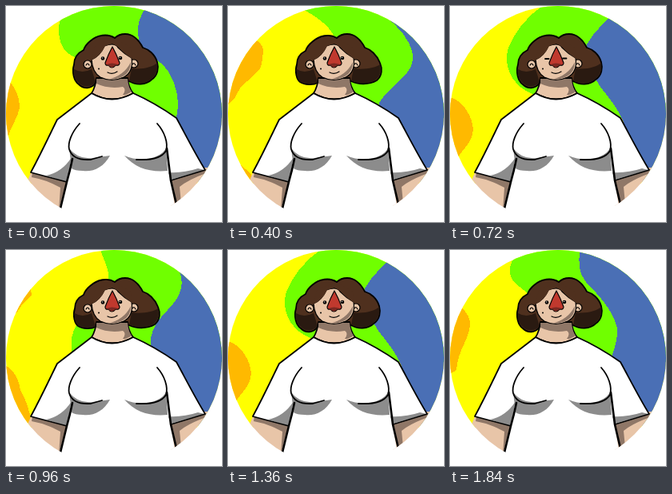
These frames come from a looping animation (270x270 px, 1.92 s). An HTML page without scripts:

```html
<!DOCTYPE html>
<html lang="en">
<head>
<meta charset="utf-8">
<title>Portrait with flowing colours</title>
<style>
html, body { margin: 0; width: 100%; height: 100%; overflow: hidden; background: #fff; }
svg { display: block; width: 100vw; height: 100vh; }
.step { visibility: hidden; animation: show .64s step-end infinite; animation-delay: calc(var(--i) * .08s - .64s); }
@keyframes show { 0% { visibility: visible; } 12.5%, 100% { visibility: hidden; } }
.open { animation: open 1.92s step-end infinite; }
.shut { visibility: hidden; animation: shut 1.92s step-end infinite; }
@keyframes open { 0%, 45.8333%, 100% { visibility: visible; } 37.5% { visibility: hidden; } }
@keyframes shut { 0%, 45.8333%, 100% { visibility: hidden; } 37.5% { visibility: visible; } }
.wave { shape-rendering: crispEdges; }
.g { fill: #70ff00; }
.b { fill: #4a6fb5; }
.o { fill: #ffb900; }
.ink { stroke: #000; stroke-width: 1.8; stroke-linejoin: round; stroke-linecap: round; }
.thin { stroke-width: 1.2; }
.bold { stroke-width: 2.6; }
.line { fill: none; }
.skin { fill: #e8c5a8; }
.dim { fill: #8f7767; }
.grey { fill: #8c8c8c; }
.hair { fill: #4f301e; }
.dark { fill: #2a1a11; }
</style>
</head>
<body>
<svg viewBox="0 0 270 270">
<defs>
  <clipPath id="disc"><circle cx="135" cy="135" r="135"/></clipPath>
  <g id="round">
    <path class="hair ink" d="M136 40C127 34 114 36 105 44Q99 49 97 55C89 59 85 66 85 73C82 83 85 94 91 98C97 104 107 104 112 96L154 94C162 99 175 99 182 92C190 87 191 77 189 70C186 60 178 54 171 52C166 42 158 35 149 35Q141 35 136 40Z"/>
    <path class="dark" d="M85 79Q95 85 107 79L112 95C106 102 97 102 92 97Q84 91 85 79ZM157 78C170 80 184 76 189 71Q191 83 182 91C174 98 162 98 154 93Z"/>
  </g>
  <g id="flared">
    <path class="hair ink" d="M136 40C127 34 114 37 105 45Q99 50 97 56C89 60 86 66 86 73C83 82 86 92 90 95C96 99 107 99 112 96L154 94C162 98 176 99 186 93C193 87 193 78 190 71C186 61 178 54 171 52C166 42 158 35 149 35Q141 35 136 40Z"/>
    <path class="dark" d="M86 79Q95 85 107 79L112 95C106 98 97 98 91 95Q85 90 86 79ZM157 78C170 80 185 77 190 73Q193 85 185 92C176 98 162 97 154 93Z"/>
  </g>
</defs>

<g clip-path="url(#disc)">
  <path fill="#ff0" d="M0 0H270V222H0Z"/>

  <g class="wave">
    <g class="step" style="--i:0">
      <path class="g" d="M74 0C66 15 64 32 68 45C72 57 80 62 92 67L130 140H270V0Z"/>
      <path class="b" d="M177 0C168 10 164 22 165 34C165 60 188 60 203 82C214 100 218 120 213 140L205 220H270V0Z"/>
      <path class="o" d="M0 92C9 96 17 112 17 127C15 140 6 150 3 162H0Z"/>
    </g>
    <g class="step" style="--i:1">
      <path class="g" d="M115 0C95 14 80 34 73 52C68 68 73 86 82 95C90 105 100 109 112 113L130 140H270V0Z"/>
      <path class="b" d="M214 0C198 16 181 30 171 48C170 66 178 87 188 101C200 117 210 128 217 145L214 220H270V0Z"/>
      <path class="o" d="M0 114C16 118 28 138 29 154C28 174 12 180 7 196H0Z"/>
    </g>
    <g class="step" style="--i:2">
      <path class="g" d="M124 0C118 18 100 32 86 52C74 72 73 92 82 108C90 116 98 120 108 122L130 140H270V0Z"/>
      <path class="b" d="M218 0C216 25 196 38 184 60C176 78 182 92 194 108C208 125 216 145 217 165L214 220H270V0Z"/>
      <path class="o" d="M0 130C14 137 26 150 28 166C28 182 20 192 16 212H0Z"/>
    </g>
    <g class="step" style="--i:3">
      <path class="g" d="M124 0C128 20 122 40 112 55C92 75 78 95 80 112C82 124 92 130 100 132L130 140H270V0Z"/>
      <path class="b" d="M210 0C216 18 214 38 200 58C184 75 178 92 182 104C190 120 205 145 214 220H270V0Z"/>
      <path class="o" d="M0 138Q16 148 22 168Q28 185 28 212L0 220Z"/>
    </g>
    <g class="step" style="--i:4">
      <path class="g" d="M118 0C124 18 132 28 126 45L100 75C86 95 78 108 83 130L130 140H270V0Z"/>
      <path class="b" d="M200 0C215 20 222 32 219 48C215 68 190 82 184 100Q178 115 182 125L200 220H270V0Z"/>
      <path class="o" d="M0 145Q14 152 18 175Q27 190 32 215L0 220ZM0 90L14 78Q20 66 32 57L30 40H0Z"/>
    </g>
    <g class="step" style="--i:5">
      <path class="g" d="M85 0C104 9 126 22 133 39L112 75V110L130 140H270V0Z"/>
      <path class="b" d="M180 0C202 16 218 30 226 46C236 66 230 78 218 90C206 102 194 112 189 121L200 220H270V0Z"/>
      <path class="o" d="M30 40Q44 46 44 57C42 68 44 78 35 84C26 94 16 98 12 108Q8 118 0 123V40ZM0 190Q20 198 34 217H0Z"/>
    </g>
    <g class="step" style="--i:6">
      <path class="g" d="M88 0C86 12 98 25 112 45C118 65 112 90 110 108L130 140H270V0Z"/>
      <path class="b" d="M172 0C190 22 216 45 222 75C222 98 205 110 196 127L200 220H270V0Z"/>
      <path class="o" d="M18 62Q36 66 36 84C32 102 18 112 8 132L0 140V60Z"/>
    </g>
    <g class="step" style="--i:7">
      <path class="g" d="M92 0C78 8 72 20 76 33C80 45 98 50 105 65L110 100L130 140H270V0Z"/>
      <path class="b" d="M163 0C160 14 160 28 170 40C185 56 204 75 209 98C210 112 205 124 202 134L205 220H270V0Z"/>
      <path class="o" d="M14 72Q26 82 25 95C22 115 10 125 8 150L0 155V72Z"/>
    </g>
  </g>

  <use class="step" style="--i:0" href="#round"/>
  <use class="step" style="--i:1" href="#round"/>
  <use class="step" style="--i:2" href="#round"/>
  <use class="step" style="--i:3" href="#flared"/>
  <use class="step" style="--i:4" href="#flared"/>
  <use class="step" style="--i:5" href="#flared"/>
  <use class="step" style="--i:6" href="#flared"/>
  <use class="step" style="--i:7" href="#round"/>

  <!-- arms -->
  <path class="skin" d="M33 204L15 245L62 275L77 215Z"/>
  <path class="dim" d="M33 208L76 219L66 256L68 227Q50 217 32 214Z"/>
  <path class="skin" d="M202 213L208 270H275V202H248Z"/>
  <path class="dim" d="M205 217L249 205L250 209Q228 217 217 226L219 247L212 248Z"/>

  <!-- neck -->
  <path class="skin ink" d="M113 90Q112 101 107 109Q133 124 159 109Q153 102 152 90Z"/>
  <path class="dim" d="M113 91H152Q153 102 157 107Q150 112 146 111Q151 104 146 101Q128 104 113 97Z"/>

  <!-- shirt -->
  <path fill="#fff" d="M107 109Q132 124 159 109Q186 121 213 140C224 160 236 184 249 205L206 218L214 270H62L76 220L31 208C46 180 56 158 64 142Q86 125 107 109Z"/>
  <path class="grey" d="M50 212Q70 208 82 189L76 220Z"/>
  <path class="grey" d="M206 217L203 208Q222 209 240 203L248 205Z"/>
  <path class="grey" d="M79 178Q90 192 108 190L130 187C122 202 108 208 96 206Q86 206 82 203Z"/>
  <path class="grey" d="M148 187Q162 193 178 191Q194 188 200 178L202 206C180 208 162 203 148 187Z"/>
  <path class="line ink" d="M107 109Q132 124 159 109Q186 121 213 140C224 160 236 184 249 205L206 218M107 109Q86 125 64 142C56 158 46 180 31 208L76 220"/>
  <path class="line ink" d="M92 147C82 158 77 171 79 179C82 189 92 193 106 192L120 188M189 147C198 157 203 171 200 181C194 191 180 193 163 192"/>
  <path class="line ink bold" d="M83 191Q80 206 76 220L68 253M201 178L206 218L213 248"/>

  <!-- head -->
  <g class="skin ink thin">
    <circle cx="102" cy="73" r="5"/>
    <circle cx="160" cy="72" r="5"/>
    <path d="M107 67C114 64 120 57 123 50Q136 45 140 52Q148 60 157 65C159 78 155 85 147 89Q132 96 118 89Q108 83 107 67Z"/>
  </g>
  <path class="dim" d="M156 70Q156 83 146 88Q138 92 127 92Q148 87 156 70Z"/>
  <path class="line ink thin" d="M100 74Q102 70 104 74M158 73Q160 70 162 74"/>
  <path class="hair" d="M106 68Q118 63 124 50L133 47L140 51Q148 60 158 66L156 52L137 41L112 48Z"/>
  <g class="open">
    <circle cx="121" cy="65.5" r="2.3"/>
    <circle cx="143" cy="65" r="2.3"/>
    <path fill="#fff" d="M120 64.5h1v1h-1zM142 64h1v1h-1z"/>
  </g>
  <path class="shut line ink" d="M119 66H123.5M141 65.5H145.5"/>
  <path class="ink thin" fill="#c0392e" d="M133 51Q128 60 124 71Q124 75 128 74Q132 80 137 74Q142 75 142 71Q138 60 133 51Z"/>
  <path fill="#7c2821" d="M126 73Q132 70 140 73L137 74Q132 79 128 74Z"/>
  <path class="line ink thin" d="M127 83Q133 86 139 82"/>
  <circle cx="116" cy="78.5" r="1"/>
</g>
</svg>
</body>
</html>
```
